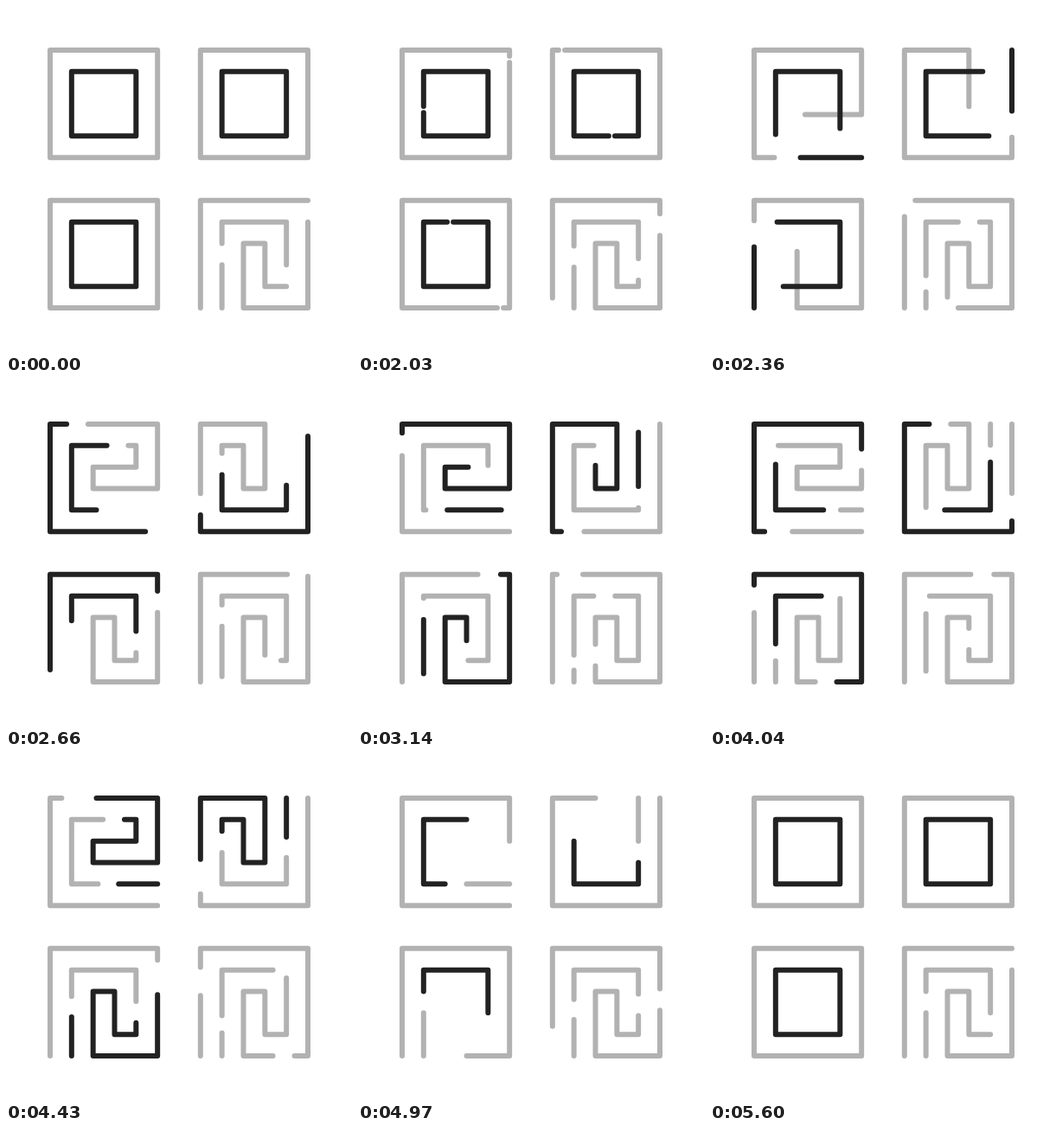
An HTML page with a canvas that plays this animation: 400 px wide and 400 px high, repeating every 7.43 s.

```html
<!DOCTYPE html>
<html lang="en">
<head>
<meta charset="utf-8">
<title>Running mazes</title>
<style>
html, body { margin: 0; width: 100%; height: 100%; overflow: hidden; background: #fff; }
canvas { display: block; }
</style>
</head>
<body>
<canvas id="stage" width="400" height="400"></canvas>
<script>
const ctx = document.getElementById('stage').getContext('2d');
const GRAY = '#b2b2b2', BLACK = '#222';
const LOOP = 7430, REST = 2000, STEP = 30, STEPS = 120;
const UNIT = 298 / 12;              // grid pitch in pixels
const OPEN = 21, TURN = 19.5;       // steps to open or close the squares, steps per maze turn

// Each route is a polyline on a 5 x 5 grid; `from` is the distance at its first point.
const maze = { from: -10, pts: [[5,0],[5,5],[0,5],[0,0],[5,0],[5,5],[2,5],[2,2],[3,2],[3,4],[4,4],[4,1],[1,1],[1,5]] };
const outer = { from: 0, pts: [[0,5],[0,0],[5,0],[5,5],[0,5]] };
const inner = { from: 13, pts: [[4,4],[4,1],[1,1],[1,4],[4,4],[4,1],[1,1],[1,4],[4,4],[4,1]] };

// Where each dash starts and ends after every turn
const heads = [-1.5, 10, 25, 32, 35, 35];
const tails = [0, 0, 11, 26, 33, 35.5];

const lerp = (a, b, u) => a + (b - a) * u;

// Draws the part of a route between distances a and b.
function dash(route, a, b, color) {
  if (b < a) return;
  ctx.strokeStyle = color;
  ctx.beginPath();
  let s = route.from, first = true;
  for (let i = 1; i < route.pts.length; i++) {
    const [x0, y0] = route.pts[i - 1], [x1, y1] = route.pts[i];
    const len = Math.abs(x1 - x0) + Math.abs(y1 - y0);
    const u = Math.max(0, (a - s) / len), v = Math.min(1, (b - s) / len);
    if (u <= v) {
      if (first) ctx.moveTo(lerp(x0, x1, u), lerp(y0, y1, u));
      ctx.lineTo(lerp(x0, x1, v), lerp(y0, y1, v));
      first = false;
    }
    s += len;
  }
  ctx.stroke();
}

function flow(j, u, color) {
  const head = lerp(heads[j], heads[j + 1], u);
  if (head >= 0) dash(maze, lerp(tails[j], tails[j + 1], u), head, color);
}

function grayMaze(k) {
  for (let j = 0; j < 5; j++) flow(j, k / 24 % 1, GRAY);
}

function openSquares(u) {
  const tail = lerp(-5.2, 11, u), head = tail - lerp(1.5, 1, u);
  dash(maze, tail, lerp(14.8, 25, u), GRAY);
  if (head >= 0) dash(maze, 0, head, BLACK);
  dash(inner, lerp(17.5, 26, u), lerp(29.5, 32, u), BLACK);
}

function closeSquares(u) {
  dash(outer, 0, lerp(17, 20, u), GRAY);
  dash(maze, 33 + 6 * u, 35, GRAY);
  dash(inner, 26, lerp(32, 38, u), BLACK);
}

function squares(k) {
  if (k < OPEN) return openSquares(k / OPEN);
  const turns = (k - OPEN) / TURN, n = Math.floor(turns), u = turns - n;
  if (n > 3) return closeSquares((k - OPEN - 4 * TURN) / OPEN);
  if (n === 3) dash(outer, 0, lerp(10, 17, u), GRAY);
  const first = n === 3 ? 2 : 0, last = n === 0 ? 3 : 4;
  for (let j = first; j <= last; j++) flow(j, u, (n + j) % 2 ? BLACK : GRAY);
}

function tile(col, row, turn, draw, k) {
  ctx.save();
  ctx.translate(51 + UNIT * (2.5 + 7 * col), 51 + UNIT * (2.5 + 7 * row));
  ctx.rotate(turn * Math.PI / 2);
  ctx.scale(UNIT, UNIT);
  ctx.translate(-2.5, -2.5);
  ctx.lineWidth = 6 / UNIT;
  ctx.lineCap = ctx.lineJoin = 'round';
  draw(k);
  ctx.restore();
}

function frame() {
  const t = performance.now() % LOOP;
  const k = Math.max(0, Math.min(STEPS, Math.floor((t - REST) / STEP)));
  ctx.fillStyle = '#fff';
  ctx.fillRect(0, 0, 400, 400);
  tile(0, 0, -1, squares, k);
  tile(1, 0, 2, squares, k);
  tile(0, 1, 0, squares, k);
  tile(1, 1, 0, grayMaze, k);
  requestAnimationFrame(frame);
}
frame();
</script>
</body>
</html>
```
